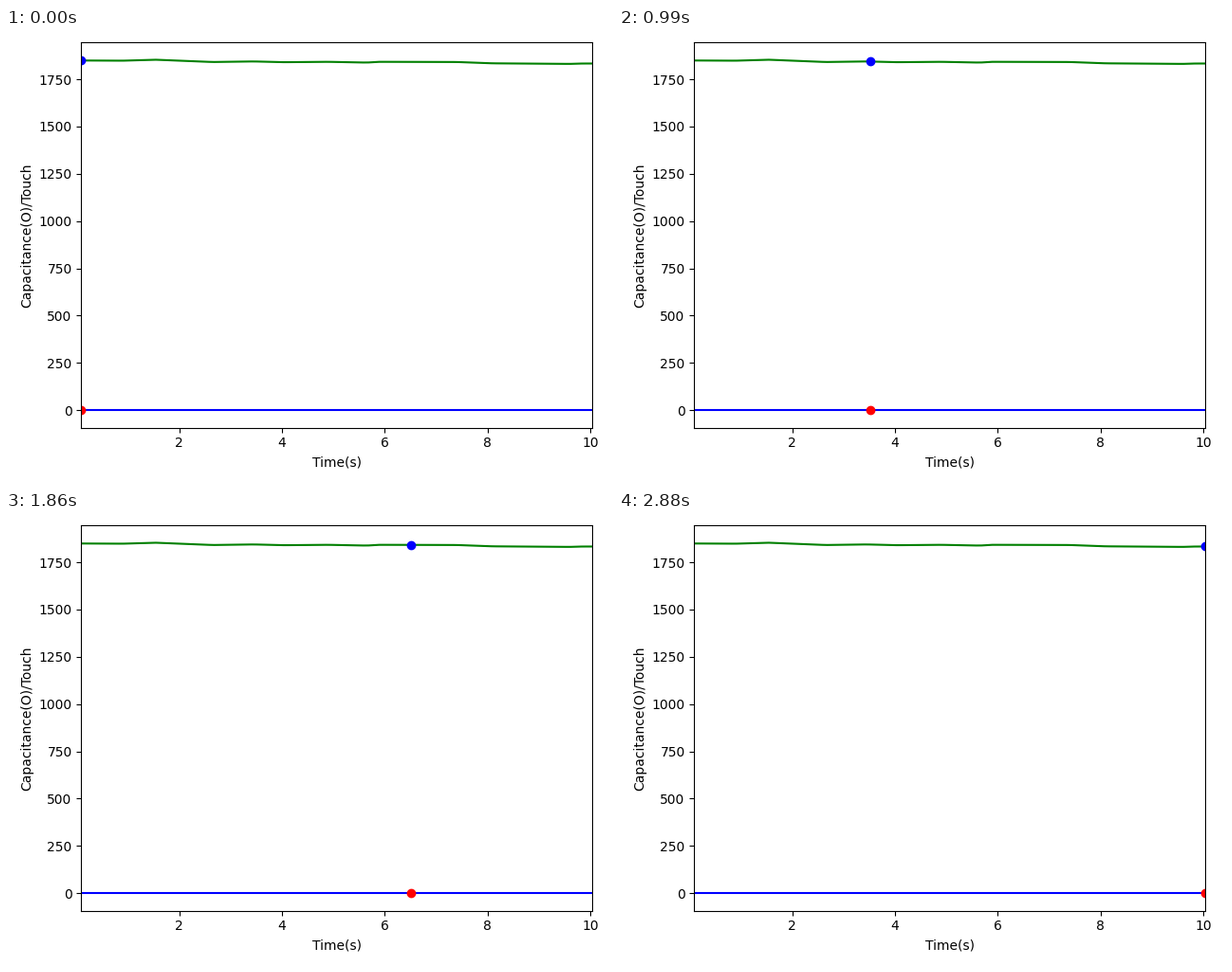
A matplotlib script for the animation above (2.91 s loop, 640x480 px).

```python
import numpy as np
import matplotlib.pyplot as plt
from matplotlib.animation import FuncAnimation

N = 97

# Main bends of the slowly sinking capacitance
BEND_TIMES = [0.1, 0.9, 1.55, 2.65, 3.45, 4.05, 4.9, 5.65, 5.9, 7.4, 8.1, 9.6, 9.85]
BEND_LEVELS = [1849, 1848, 1853, 1841, 1844, 1840, 1842, 1838, 1842, 1841, 1834, 1831, 1833]

time = np.linspace(0.095, 10.035, N)
capacitance = np.interp(time, BEND_TIMES, BEND_LEVELS)
touch = np.zeros(N)

plt.rcParams["font.family"] = "DejaVu Sans"
fig, ax = plt.subplots(figsize=(6.4, 4.8), dpi=100)
ax.set_xlabel("Time(s)")
ax.set_ylabel("Capacitance(O)/Touch")
ax.set_xlim(time[0], time[-1])


def add_trace(values, line_color, dot_color):
    ax.plot(time, values, color=line_color)
    dot, = ax.plot(time[:1], values[:1], "o", color=dot_color)
    return dot, values


traces = [add_trace(capacitance, "green", "blue"),
          add_trace(touch, "blue", "red")]
fig.tight_layout()


def update(i):
    for dot, values in traces:
        dot.set_data([time[i]], [values[i]])
    return [dot for dot, _ in traces]


anim = FuncAnimation(fig, update, frames=N, interval=30,
                     repeat=True, repeat_delay=0)
plt.show()
```
